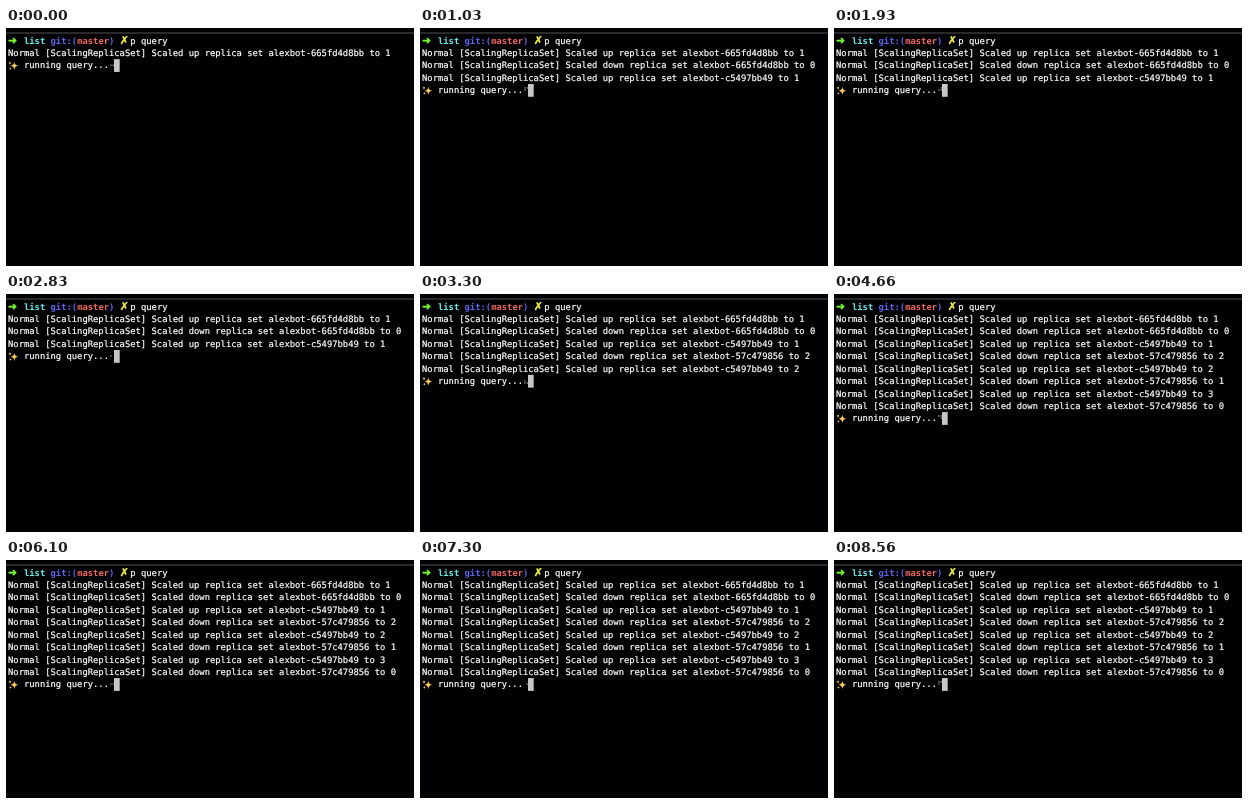
Animation of 408x238 px, one loop 8600 ms. Source, as an HTML page:

```html
<!DOCTYPE html>
<html lang="en">
<head>
<meta charset="utf-8">
<title>Terminal query</title>
<style>
  html, body { margin: 0; width: 100%; height: 100%; overflow: hidden; background: #000; }
  svg { display: block; width: 408px; height: 238px; }
  text {
    font: 8.84px "DejaVu Sans Mono", "Liberation Mono", monospace;
    fill: currentColor;
    stroke: currentColor;
    stroke-width: 0.22px;
    color: #fff;
    white-space: pre;
    text-rendering: geometricPrecision;
  }
  .bold { font-weight: bold; stroke: none; }
  .icon { font-family: "DejaVu Sans", sans-serif; font-size: 10.8px; stroke-width: 0.4px; }
</style>
</head>
<body>
<svg id="stage" viewBox="0 0 408 238">
  <rect width="408" height="238" fill="#010103"/>
  <rect y="4" width="408" height="2" fill="#29292b"/>
  <g id="prompt"></g>
  <g id="log"></g>
  <g id="status">
    <g fill="#f5c95a">
      <path d="M8.3 2.4Q8.6 6.1 12.2 6.7Q8.6 7.3 8.3 11Q8 7.3 4.6 6.7Q8 6.1 8.3 2.4Z"/>
      <path d="M4 2Q4.1 3.7 5.6 3.9Q4.1 4.1 4 5.8Q3.9 4.1 2.4 3.9Q3.9 3.7 4 2Z"/>
      <path d="M4.4 8Q4.5 9.3 5.7 9.4Q4.5 9.5 4.4 10.8Q4.3 9.5 3.1 9.4Q4.3 9.3 4.4 8Z"/>
    </g>
    <g id="dots" fill="#d0d0d0"></g>
    <rect x="108" width="5.7" height="12.8" fill="#c7c7c7"/>
  </g>
</svg>
<script>
const LOOP = 8600, TICK = 100 / 3;
const LEFT = 2, CELL = 5.32, TOP = 6.3, ROW = 12.42, BASE = 9.3;
const NS = "http://www.w3.org/2000/svg";
const $ = id => document.getElementById(id);

function add(parent, tag, attrs, content = "") {
  const el = document.createElementNS(NS, tag);
  for (const name in attrs) el.setAttribute(name, attrs[name]);
  el.textContent = content;
  return parent.appendChild(el);
}

function write(parent, col, y, content, attrs = {}) {
  return add(parent, "text", { x: LEFT + col * CELL, y, ...attrs }, content);
}

// Shell prompt: column, text, colour, class
const prompt = [
  [0, "➜", "#74f52c", "icon"],
  [3, "list", "#66eeee", "bold"],
  [8, "git:(", "#6068ee", "bold"],
  [13, "master", "#f06a62", "bold"],
  [19, ")", "#6068ee", "bold"],
  [21, "✗", "#f8f53c", "icon"],
  [23, "p query", "#fff", ""]
];
for (const [col, content, color, cls] of prompt)
  write($("prompt"), col, TOP + BASE + (cls === "icon" ? 0.7 : 0), content,
    { style: `color:${color}`, class: cls });

// Log rows: time shown, direction, replica set, count
const events = [
  [0, "up", "665fd4d8bb", 1],
  [1030, "down", "665fd4d8bb", 0],
  [1030, "up", "c5497bb49", 1],
  [2860, "down", "57c479856", 2],
  [2860, "up", "c5497bb49", 2],
  [4660, "down", "57c479856", 1],
  [4660, "up", "c5497bb49", 3],
  [4660, "down", "57c479856", 0]
];
const rows = events.map(([, dir, set, count], i) =>
  write($("log"), 0, TOP + (i + 1) * ROW + BASE,
    `Normal [ScalingReplicaSet] Scaled ${dir} replica set alexbot-${set} to ${count}`));

write($("status"), 3, BASE, "running query...");

// Braille spinner; bits 0-2 are the left column, 3-5 the right one
const spinner = [..."⠋⠙⠚⠒⠂⠂⠒⠲⠴⠦⠖⠒⠐⠐⠒⠓⠋"].map(c => c.charCodeAt(0) - 0x2800);
const dots = Array.from({ length: 6 }, (_, i) => add($("dots"), "circle", {
  cx: i < 3 ? 104.9 : 107.2, cy: 3.9 + (i % 3) * 2.1, r: 0.65
}));

// Spinner progress: tick, steps taken
const pace = [[0, 6.5], [31, 50.5], [85, 124.5], [125, 185.5], [140, 205.5], [183, 266.5], [257, 373.5]];

function stepsAt(tick) {
  let i = 1;
  while (i < pace.length - 1 && tick > pace[i][0]) i++;
  const [t0, s0] = pace[i - 1], [t1, s1] = pace[i];
  return Math.floor(s0 + (s1 - s0) * (tick - t0) / (t1 - t0));
}

function draw(time) {
  const shown = events.filter(e => e[0] <= time).length;
  rows.forEach((row, i) => row.setAttribute("visibility", i < shown ? "visible" : "hidden"));
  $("status").setAttribute("transform", `translate(0 ${TOP + (shown + 1) * ROW})`);
  const tick = Math.min(257, Math.floor((time + 7) / TICK));
  const mask = spinner[stepsAt(tick) % spinner.length];
  dots.forEach((dot, i) => dot.setAttribute("visibility", mask >> i & 1 ? "visible" : "hidden"));
}

const start = performance.now();
function loop() {
  draw((performance.now() - start) % LOOP);
  requestAnimationFrame(loop);
}
loop();
</script>
</body>
</html>
```
